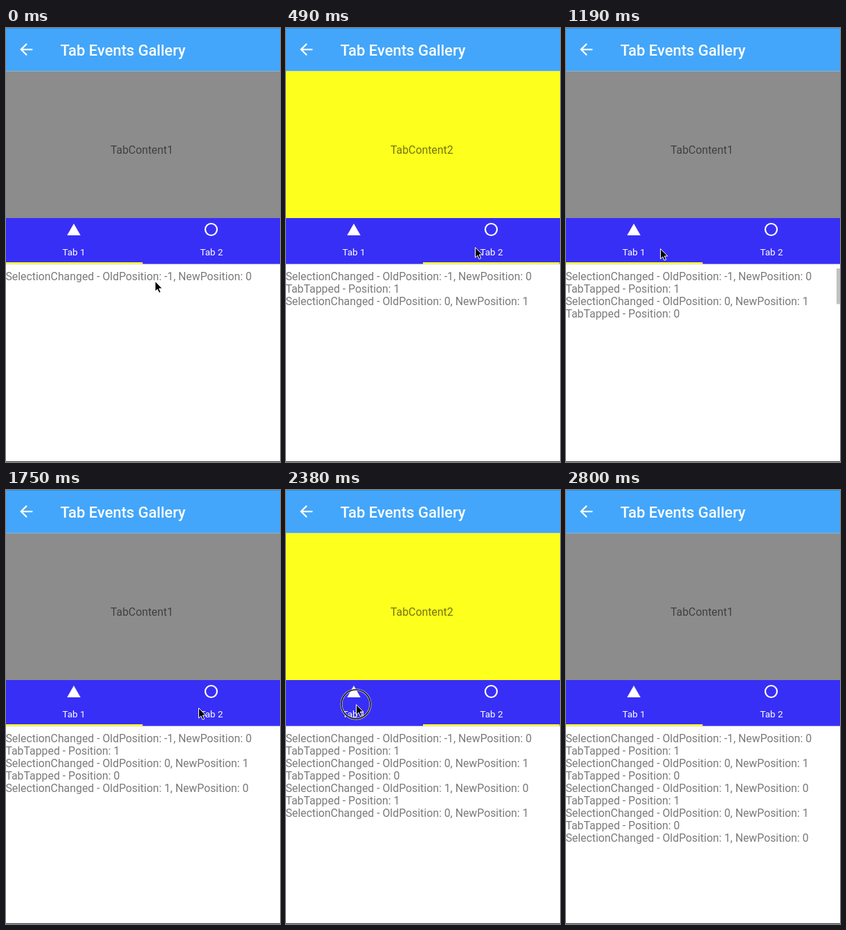
An HTML page for the animation above (2870 ms loop, 396 by 628 pixels).

```html
<!DOCTYPE html>
<html lang="en">
<head>
<meta charset="utf-8">
<title>Tab Events Gallery</title>
<style>
  html, body { margin: 0; width: 100%; height: 100%; overflow: hidden; background: #fff; }
  svg { display: block; }
  text { font-family: Roboto, sans-serif; font-size: 15.85px; }
  .title { font-size: 22px; font-weight: 500; fill: #fff; }
  .tab { font-size: 13.5px; fill: #fff; text-anchor: middle; }
  .label { fill-opacity: .54; text-anchor: middle; }
  #log { fill: #7a7a7a; }
</style>
</head>
<body>
<svg width="396" height="628" viewBox="0 0 396 628">
  <rect width="396" height="62.5" fill="#43a6fa"/>
  <rect width="396" height="1" fill="#3b8fd6"/>
  <path transform="translate(15.7 17.5) scale(1.13)" fill="#fff"
    d="M20 11H7.83l5.59-5.59L12 4l-8 8 8 8 1.41-1.41L7.83 13H20z"/>
  <text class="title" x="78.5" y="40">Tab Events Gallery</text>

  <rect id="page" y="62.5" width="396" height="212.5"/>
  <text id="caption" class="label" x="196.3" y="181.5"></text>

  <rect y="275" width="396" height="66.5" fill="#382ff7"/>
  <path d="M98 283l9.7 17H88.3z" fill="#fff"/>
  <circle cx="296.5" cy="291.5" r="8.5" fill="none" stroke="#fff" stroke-width="2.2"/>
  <text class="tab" x="98" y="329">Tab 1</text>
  <text class="tab" x="297" y="329">Tab 2</text>
  <rect id="indicator" y="339" width="197.5" height="2.7" fill="#ffff3a"/>

  <g id="log"></g>
  <rect id="scrollbar" x="391" y="348" width="5" height="51.5" fill="#c2c2c2"/>
  <rect y="627" width="396" height="1" fill="#333"/>

  <g id="pointer">
    <g id="ring" fill="none">
      <circle r="21" stroke="#ddd" stroke-width="3"/>
      <circle r="21" stroke="#111" stroke-width="1.6"/>
    </g>
    <path d="M.5 .5v14.6l3.3-3.1 2.4 5.3 2.5-1.1-2.4-5.2h4.6z" fill="#000" stroke="#fff"/>
  </g>
</svg>
<script>
const LOOP = 2870, STEP = 70, LINE = 18;
const taps = [
  { at: 280, tab: 1 }, { at: 1190, tab: 0 },
  { at: 1890, tab: 1 }, { at: 2450, tab: 0 },
];
// Pointer stops: time, x, y
const stops = [
  [0, 215, 366], [210, 273, 317], [560, 273, 317], [980, 136, 319],
  [1260, 136, 319], [1680, 278, 315], [2030, 278, 315], [2380, 101, 310], [LOOP, 101, 310],
];
const $ = id => document.getElementById(id);
const show = (id, on) => $(id).setAttribute('visibility', on ? 'visible' : 'hidden');

// Every log line with the moment it appears
const selection = (from, to) => `SelectionChanged - OldPosition: ${from}, NewPosition: ${to}`;
const entries = [{ at: 0, text: selection(-1, 0) }];
for (const { at, tab } of taps) {
  entries.push({ at, text: `TabTapped - Position: ${tab}` },
    { at: at + STEP, text: selection(1 - tab, tab) });
}
entries.forEach((entry, i) => {
  const node = document.createElementNS('http://www.w3.org/2000/svg', 'text');
  node.setAttribute('x', -0.6);
  node.setAttribute('y', 365 + i * LINE);
  node.textContent = entry.text;
  entry.node = $('log').appendChild(node);
});

function pointerAt(t) {
  const i = stops.findIndex(stop => stop[0] > t);
  const [t0, x0, y0] = stops[i - 1], [t1, x1, y1] = stops[i];
  const p = (t - t0) / (t1 - t0), e = p * p * (3 - 2 * p);
  return [x0 + (x1 - x0) * e, y0 + (y1 - y0) * e];
}

function draw(t) {
  const last = taps.filter(tap => tap.at <= t).pop();
  const tab = last ? last.tab : 0;
  $('page').setAttribute('fill', tab ? '#fdff1c' : '#8c8c8c');
  $('caption').textContent = `TabContent${tab + 1}`;
  $('indicator').setAttribute('x', tab * 198);
  for (const { at, node } of entries) {
    node.setAttribute('visibility', t >= at ? 'visible' : 'hidden');
  }

  const age = last ? t - last.at : LOOP;
  $('scrollbar').setAttribute('opacity', Math.max(0, Math.min(1, (210 - age) / 140)));
  show('ring', taps.some(tap => t < tap.at && t >= tap.at - STEP));
  $('pointer').setAttribute('transform', `translate(${pointerAt(t)})`);
  $('pointer').setAttribute('display', t < 2660 ? 'inline' : 'none');
}

function tick() {
  const t = performance.now() % LOOP;
  draw(Math.floor(t / STEP) * STEP);
  requestAnimationFrame(tick);
}
tick();
</script>
</body>
</html>
```
